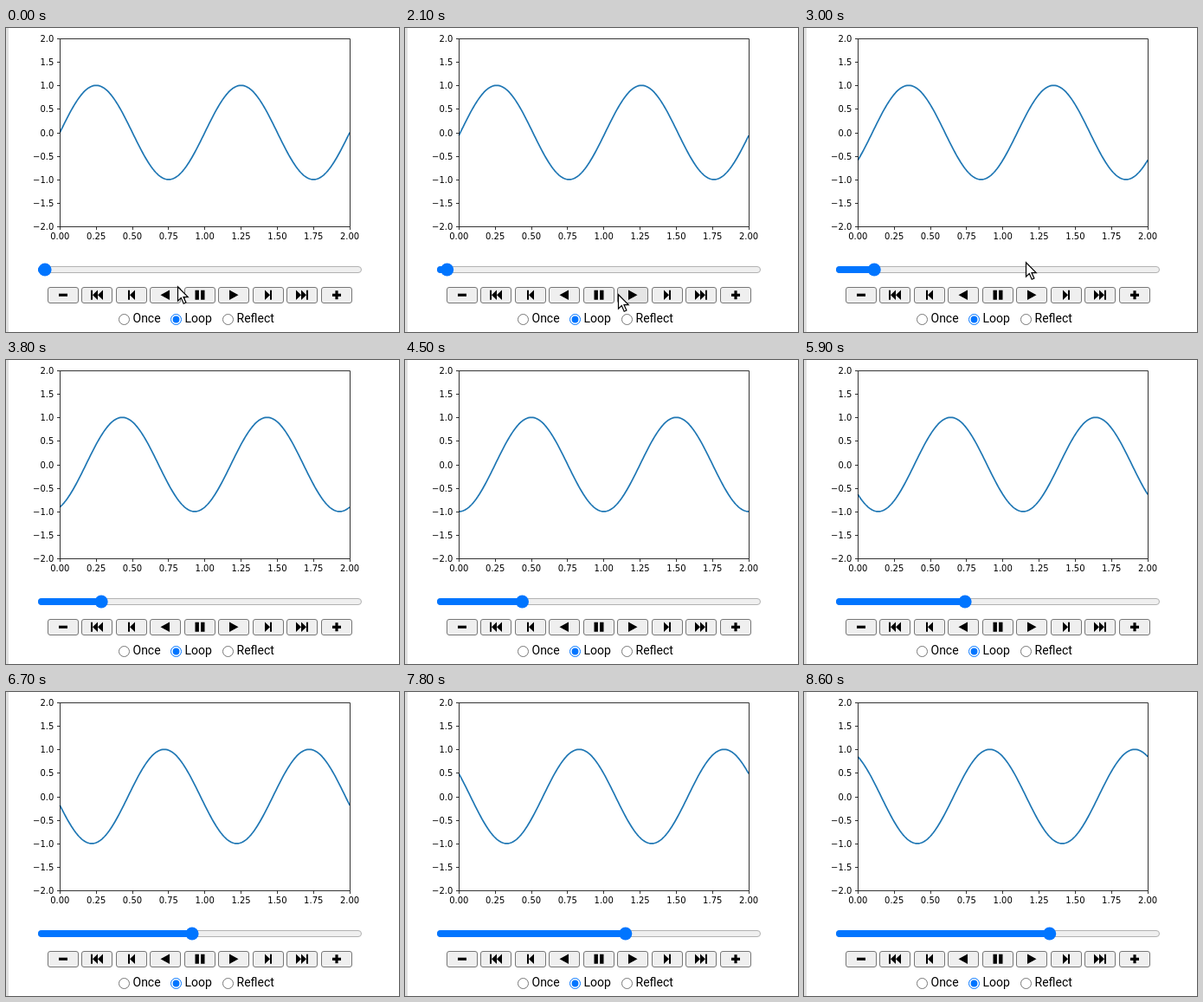
An HTML page for the animation above (8800 ms loop, 454x351 px).

```html
<!DOCTYPE html>
<html lang="en">
<head>
<meta charset="utf-8">
<title>Sine wave player</title>
<style>
  html, body { margin: 0; width: 100%; height: 100%; overflow: hidden; background: #fff; }
  svg { display: block; }
  .axis text { font: 10px "DejaVu Sans", sans-serif; }
  .mode { font: 14px Roboto, sans-serif; }
  .axis path { fill: none; stroke: #000; stroke-width: .8; }
  .button { fill: #efefef; stroke: #767676; }
  .button.hover { fill: #e5e5e5; }
  .radio { fill: #fff; stroke: #767676; }
  .radio.on { stroke: #0075ff; }
</style>
</head>
<body>
<svg id="stage" width="454" height="351" viewBox="0 0 454 351">
  <rect width="3" height="351" fill="#e0e0e0"/>
</svg>
<script>
const stage = document.getElementById('stage');
const LOOP = 8800, STEP = 100, PLAY_AT = 2000, LAST = 66;
const LEFT = 62.3, WIDTH = 334.8, MIDDLE = 120.6, UNIT = 54.36;

function add(tag, attrs, parent = stage) {
  const el = document.createElementNS('http://www.w3.org/2000/svg', tag);
  for (const key in attrs) {
    if (key === 'text') el.textContent = attrs[key];
    else el.setAttribute(key, attrs[key]);
  }
  parent.appendChild(el);
  return el;
}

// Plot
const wave = add('path', { fill: 'none', stroke: '#1f77b4', 'stroke-width': 1.7, 'stroke-linejoin': 'round' });
const axis = add('g', { class: 'axis' });
let ticks = 'M62.5 12.5H397.5V229.5H62.5Z';
for (let i = 0; i <= 8; i++) {
  const x = LEFT + WIDTH * i / 8, y = MIDDLE + UNIT * (i - 4) / 2;
  const value = 2 - i / 2;
  ticks += `M${Math.floor(x) + .5} 229.5v3.5M62.5 ${Math.floor(y + .5) + .5}h-3.5`;
  add('text', { x, y: 244, 'text-anchor': 'middle', text: (i / 4).toFixed(2) }, axis);
  add('text', { x: 55.3, y: y + 3.9, 'text-anchor': 'end', text: value.toFixed(1).replace('-', '\u2212') }, axis);
}
add('path', { d: ticks }, axis);

// Slider
add('rect', { x: 37.5, y: 275.5, width: 373, height: 7, rx: 3.5, fill: '#efefef', stroke: '#b2b2b2' });
const fill = add('rect', { x: 37, y: 275, height: 8, rx: 4, fill: '#0075ff' });
const thumb = add('circle', { cy: 279, r: 7.6, fill: '#0075ff' });

// Buttons, icons drawn around their centre
const bar = (x, w) => `M${x}-5.5h${w}v11h${-w}Z`;
const tri = (x, w) => `M${x}-5.7l${w} 5.7l${-w} 5.7Z`;
const minus = 'M-5-1.6h10v3.2h-10Z';
const skip = bar(5, 2) + tri(-7, 6) + tri(-1, 6);
const next = bar(2, 2) + tri(-4, 6);
const play = tri(-5, 10.5);
const icons = [
  [minus], [skip, -1], [next, -1], [play, -1], [bar(-5.5, 4.4) + bar(1.1, 4.4)],
  [play], [next], [skip], [minus + 'M-1.6-5h3.2v10h-3.2Z']
];
const buttons = icons.map(([d, flip = 1], i) => {
  const x = Math.round(48 + 39.5 * i - .1);
  const el = add('rect', { class: 'button', x: x + .5, y: 299.5, width: 35, height: 18, rx: 2.5 });
  add('path', { d, transform: `translate(${x + 18} 308.3) scale(${flip} 1)` });
  return { el, x };
});

// Loop modes
[['Once', 136.5], ['Loop', 196.5], ['Reflect', 256.5]].forEach(([text, cx], i) => {
  add('circle', { class: i === 1 ? 'radio on' : 'radio', cx, cy: 336.5, r: 6 });
  if (i === 1) add('circle', { cx, cy: 336.5, r: 3.9, fill: '#0075ff' });
  add('text', { class: 'mode', x: cx + 10, y: 340, text });
});

const pointer = add('path', {
  d: 'M.5.8V17.2L4.3 13.6L7.2 20.2L9.9 19L7 12.6H12.2Z',
  fill: '#fff', stroke: '#000', 'stroke-width': 1.2
});

// Pointer stops: time, x, y
const stops = [
  [0, 198, 298], [100, 198, 298], [600, 193, 302], [900, 193, 302],
  [1000, 207, 298], [1200, 236, 307], [1500, 236, 307], [1900, 246, 307],
  [2600, 246, 307], [2900, 247, 305], [3000, 256, 270], [3300, 340, 25]
];

function pointerAt(t) {
  const i = stops.findIndex(s => s[0] > t);
  if (i < 0) return stops[stops.length - 1].slice(1);
  const [t0, x0, y0] = stops[i - 1], [t1, x1, y1] = stops[i];
  const k = (t - t0) / (t1 - t0);
  return [x0 + (x1 - x0) * k, y0 + (y1 - y0) * k];
}

function draw(now) {
  const t = Math.floor(now % LOOP / STEP) * STEP;
  const n = Math.min(LAST, Math.max(0, (t - PLAY_AT) / STEP));

  let d = '';
  for (let i = 0; i <= 200; i++) {
    const y = MIDDLE - UNIT * Math.sin(2 * Math.PI * (i - n) / 100);
    d += (i ? 'L' : 'M') + (LEFT + WIDTH * i / 200).toFixed(2) + ' ' + y.toFixed(2);
  }
  wave.setAttribute('d', d);

  const cx = 45 + 358 * n / 99;
  thumb.setAttribute('cx', cx);
  fill.setAttribute('width', cx - 37);

  const [px, py] = pointerAt(t);
  const shown = t <= 3300;
  pointer.setAttribute('visibility', shown ? 'visible' : 'hidden');
  pointer.setAttribute('transform', `translate(${Math.round(px)} ${Math.round(py)})`);
  for (const { el, x } of buttons) {
    const over = shown && t >= 200 && py >= 299 && px >= x && px < x + 36;
    el.classList.toggle('hover', over);
  }
}

const start = performance.now();
function tick() {
  draw(performance.now() - start);
  requestAnimationFrame(tick);
}
tick();
</script>
</body>
</html>
```
